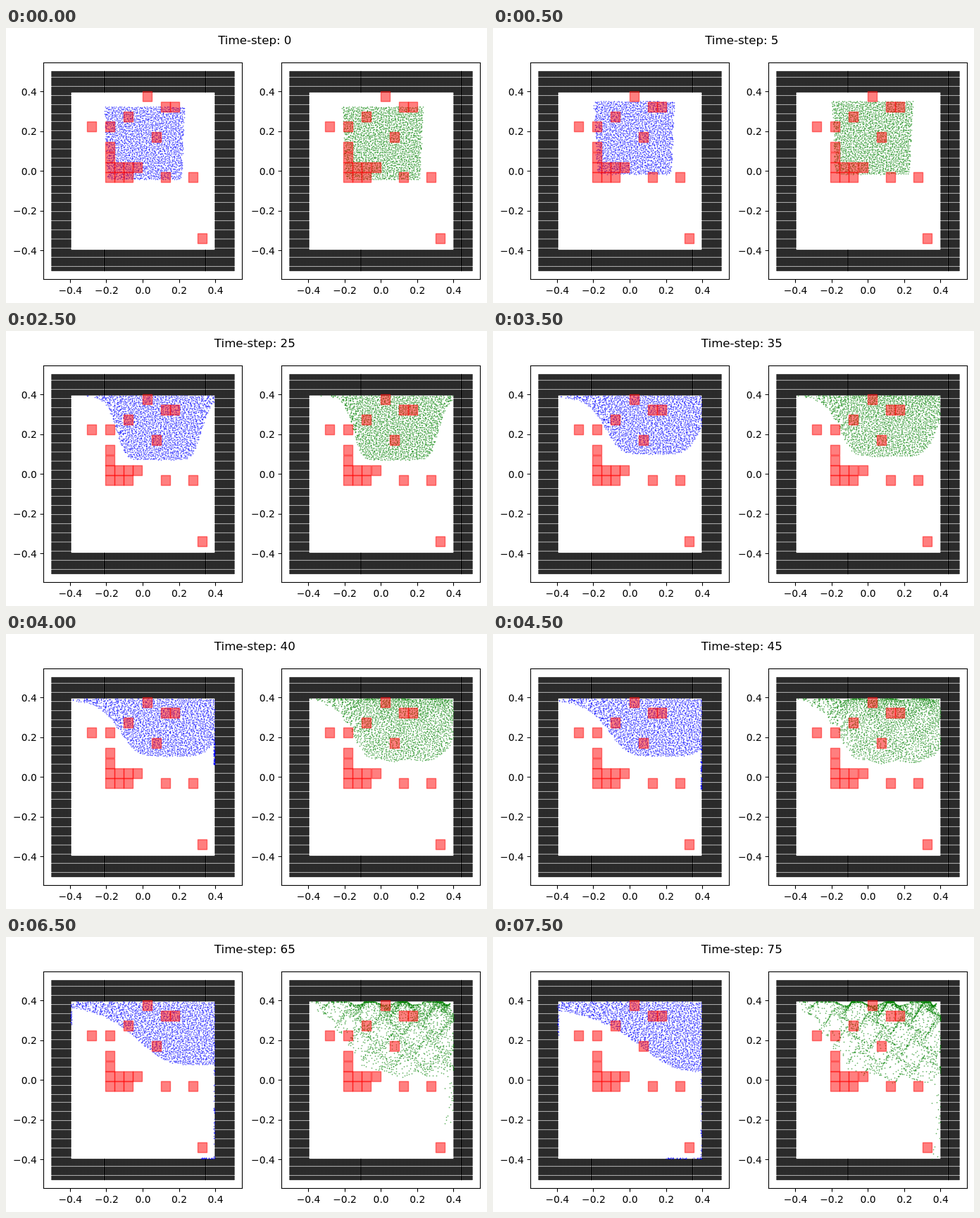
These frames come from a looping animation (683x391 px, 8000 ms). An HTML page with a canvas:

```html
<!DOCTYPE html>
<html lang="en">
<head>
<meta charset="utf-8">
<title>Particle simulation</title>
<style>
html, body { margin: 0; width: 100%; height: 100%; overflow: hidden; background: #fff; }
canvas { display: block; }
</style>
</head>
<body>
<canvas id="stage" width="683" height="391"></canvas>
<script>
const ctx = document.getElementById('stage').getContext('2d');
const LOOP = 8000, HOLD = 500, STEPS_PER_HOLD = 5;
const PANEL_SHIFT = 338.18;
const LEFT = 91, RIGHT = 297, CEILING = 91, FLOOR = 316;
const COLS = 50, ROWS = 48, AREA = 11440;

const clamp = (n, lo, hi) => Math.max(lo, Math.min(hi, n));

let seed = 7;
function rnd() {
  seed = (seed * 1664525 + 1013904223) % 4294967296;
  return seed / 4294967296;
}

const makeGrains = () => Array.from({ length: COLS * ROWS }, (_, i) => ({
  u: (Math.floor(i / ROWS) + rnd()) / COLS,
  v: (i % ROWS + rnd()) / ROWS,
  f: rnd()
}));
const blue = makeGrains(), green = makeGrains();

// A block thrown up and to the right: it hits the ceiling, then widens into a bump.
// Its area is kept, so the depth follows from the outline.
function makeBody(step, lean, softness) {
  const center = 197 + .75 * step + lean * step ** 3;
  const width = 55 + .95 * Math.max(0, step - 18);
  const power = 8 - step * softness + 60 * Math.exp(-((step / 14) ** 2));
  const shape = x => 1 / (1 + Math.abs((x - center) / width) ** power);
  const sums = [0];
  for (let x = LEFT; x < RIGHT; x++) sums.push(sums[sums.length - 1] + shape(x + .5));
  const total = sums[sums.length - 1];
  const top = CEILING + 1 + 20 * Math.max(0, 1 - step / 13);
  // Equal shares of u cover equal areas of the body.
  return (u, v) => {
    const part = u * total;
    const i = Math.max(1, sums.findIndex(s => s >= part));
    const x = LEFT + i - 1 + (part - sums[i - 1]) / (sums[i] - sums[i - 1]);
    return [x, top + v * shape(x) * AREA / total];
  };
}

function makeBlueMotion(step) {
  const body = makeBody(step, 1.1e-4, 1 / 15);
  return (g, i) => {
    // A few grains run down the right wall and back along the floor.
    if (i % 40 === 0 && step >= 40) {
      const y = 150 + g.f * (36 + 7 * (step - 40));
      return y < FLOOR ? [RIGHT - g.v * 2, y] : [RIGHT - (y - FLOOR) * .44, FLOOR - g.v * 2];
    }
    // Others trickle down the left wall.
    if (i % 120 === 1 && step >= 50) return [LEFT + 1 + g.v * 3, 96 + g.f * (step - 45) * 1.5];
    return body(g.u, g.v);
  };
}

function makeGreenMotion(step) {
  const body = makeBody(step, 0, 1 / 25);
  const late = clamp((step - 30) / 45, 0, 1);
  return (g, i) => {
    if (i % 100 === 3 && step >= 50)
      return [RIGHT - 14 * g.v ** 2, 180 + g.f * (35 + 5.1 * (step - 55))];
    const [x, y] = body(g.u ** (1 - .15 * late), (1 + .5 * late) * g.v ** (1 + 1.2 * late));
    // A wavy field gathers the thinning spray into clumps.
    const swirl = 6 * late;
    return [
      clamp(x + swirl * Math.sin(y / 6 + x / 9), LEFT + 1, RIGHT),
      Math.max(CEILING + 1, y + swirl * Math.sin(x / 7 - y / 11))
    ];
  };
}

// A round marker about three pixels wide, snapped to the pixel grid.
function dot(x, y, core, arm, corner) {
  if (corner) {
    ctx.globalAlpha = corner;
    ctx.fillRect(x - 1, y - 1, 3, 3);
  }
  ctx.globalAlpha = arm;
  ctx.fillRect(x - 1, y, 3, 1);
  ctx.fillRect(x, y - 1, 1, 3);
  ctx.globalAlpha = core;
  ctx.fillRect(x, y, 1, 1);
}

function drawWalls(shift) {
  const last = 130, thick = 13;
  const inside = n => n > thick && n < last - thick;
  ctx.fillStyle = '#000';
  for (let i = 0; i <= last; i++)
    for (let k = 0; k <= last; k++)
      if (!inside(i) || !inside(k))
        dot(Math.floor(65.53 + shift + i * 1.986), Math.floor(344.5 - k * 2.17), 1, .65, .16);
  ctx.globalAlpha = 1;
}

function drawGrains(grains, motion, color, shift) {
  ctx.fillStyle = color;
  grains.forEach((g, i) => {
    const [x, y] = motion(g, i);
    dot(Math.floor(x + shift), Math.floor(y), .45, .18, 0);
  });
  ctx.globalAlpha = 1;
}

// Obstacles by grid column and row: a stacked corner and scattered singles.
const blocks = [[6, 0], [8, 1], [9, 1], [4, 2], [0, 3], [2, 3], [7, 4], [5, 7], [8, 8], [11, 8], [12, 14]];
for (let r = 5; r <= 8; r++)
  for (let c = 2; c <= (r < 7 ? 2 : 4); c++) blocks.push([c, r]);

function drawBlocks(shift) {
  ctx.fillStyle = ctx.strokeStyle = 'rgba(255,0,0,.5)';
  ctx.lineWidth = 1.39;
  ctx.lineJoin = 'round';
  for (const [c, r] of blocks) {
    const x = Math.round(114.9 + 13.1 * c + shift) + .5;
    const y = Math.round(90.2 + 14.4 * r) + .5;
    ctx.fillRect(x, y, 13, 14);
    ctx.strokeRect(x, y, 13, 14);
  }
}

function drawAxes(shift) {
  const x0 = 53.5 + Math.round(shift);
  ctx.strokeStyle = ctx.fillStyle = '#000';
  ctx.lineWidth = 1.1;
  ctx.lineJoin = 'miter';
  ctx.strokeRect(x0, 49.5, 282, 308);
  ctx.font = '13.89px "DejaVu Sans", sans-serif';
  ctx.beginPath();
  for (let k = -2; k <= 2; k++) {
    const label = (k < 0 ? '\u2212' : '') + (Math.abs(k) * .2).toFixed(1);
    const x = 194.46 + shift + k * 51.56, y = 203.5 - k * 56.5;
    const tx = Math.floor(x) + .5, ty = Math.floor(y) + .5;
    ctx.moveTo(tx, 357.5);
    ctx.lineTo(tx, 362.4);
    ctx.moveTo(x0, ty);
    ctx.lineTo(x0 - 4.9, ty);
    ctx.textAlign = 'center';
    ctx.fillText(label, x, 378);
    ctx.textAlign = 'right';
    ctx.fillText(label, x0 - 9.7, Math.floor(y + 5.5));
  }
  ctx.stroke();
}

function draw(step) {
  ctx.fillStyle = '#fff';
  ctx.fillRect(0, 0, 683, 391);
  const panels = [
    [0, blue, makeBlueMotion(step), '#00f'],
    [PANEL_SHIFT, green, makeGreenMotion(step), '#008000']
  ];
  for (const [shift, grains, motion, color] of panels) {
    drawWalls(shift);
    drawGrains(grains, motion, color, shift);
    drawBlocks(shift);
    drawAxes(shift);
  }
  ctx.font = '16.67px "DejaVu Sans", sans-serif';
  ctx.textAlign = 'center';
  ctx.fillText('Time-step: ' + step, 353.3, 23);
}

let shown = -1;
function tick() {
  const step = Math.floor(performance.now() % LOOP / HOLD) * STEPS_PER_HOLD;
  if (step !== shown) draw(shown = step);
  requestAnimationFrame(tick);
}
tick();
</script>
</body>
</html>
```
